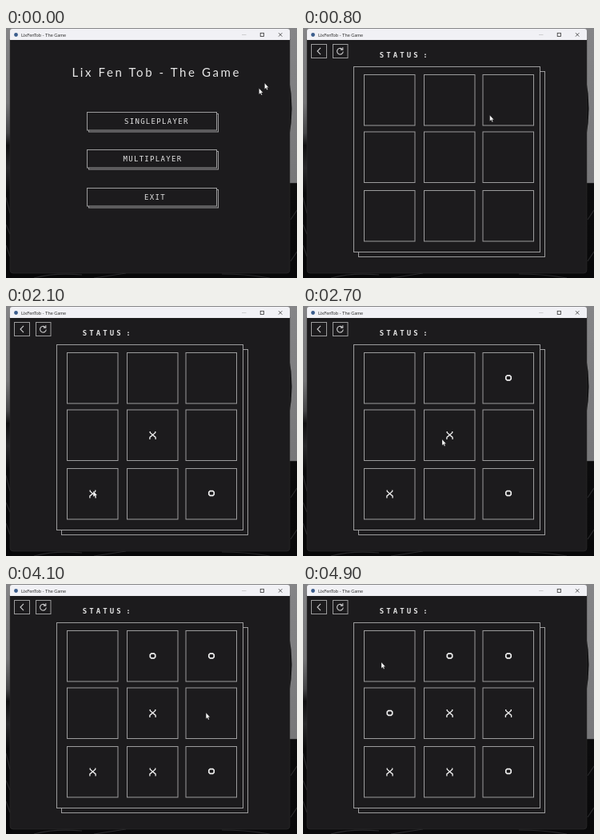
These frames come from a looping animation (364 px wide and 313 px high, 5000 ms). An HTML page:

```html
<!DOCTYPE html>
<html lang="en">
<head>
<meta charset="utf-8">
<title>LixFenTob - The Game</title>
<style>
  html, body { margin: 0; width: 100%; height: 100%; overflow: hidden; background: #080808; }
  svg { display: block; width: 364px; height: 313px; }
  .line, .box { fill: none; stroke: #9c9c9d; stroke-width: 1; }
  .box { fill: #1c1b1d; }
  .icon { fill: none; stroke: #d0d0d1; stroke-width: 1.1; }
  .caption { font: 5.8px Lato, "Open Sans", sans-serif; fill: #333; }
  .heading { font: 15px Lato, "Open Sans", sans-serif; letter-spacing: 2.6px; fill: #e8e8e8; }
  .pixel { font: 9px "DejaVu Sans Mono", "Noto Sans Mono", monospace; fill: #e4e4e4; }
  .label { letter-spacing: 1.3px; }
  .status { letter-spacing: 3.1px; font-weight: bold; }
  .mark { fill: none; stroke: #eee; stroke-width: 1.3; }
  .ring { stroke-width: 1.7; }
  .streak { fill: none; stroke: #29292b; stroke-width: 1.2; }
</style>
</head>
<body>
<svg viewBox="0 0 364 313" xmlns="http://www.w3.org/2000/svg">
  <defs>
    <linearGradient id="leftWall" x1="0" y1="0" x2="0" y2="1">
      <stop offset="0" stop-color="#858587"/>
      <stop offset=".3" stop-color="#747476"/>
      <stop offset=".42" stop-color="#454547"/>
      <stop offset=".47" stop-color="#101011"/>
      <stop offset=".56" stop-color="#29292b"/>
      <stop offset=".66" stop-color="#0b0b0c"/>
      <stop offset="1" stop-color="#070708"/>
    </linearGradient>
    <linearGradient id="rightWall" x1="0" y1="0" x2="0" y2="1">
      <stop offset="0" stop-color="#858587"/>
      <stop offset=".618" stop-color="#777779"/>
      <stop offset=".622" stop-color="#0c0c0d"/>
      <stop offset="1" stop-color="#080809"/>
    </linearGradient>
    <path id="arrow" d="M0 0V7.4L1.7 5.9L2.9 8.6L4 8.1L2.8 5.5H5Z" fill="#fff" stroke="#222" stroke-width=".3"/>
    <path id="X" class="mark" d="M-3.3-5V-3.6L0-.6L3.3-3.6V-5M-3.6 5V2.4L0-.6L3.6 2.4V5"/>
    <path id="O" class="mark ring" d="M-1.7-2.9H1.7L3.2-1.5V1.5L1.7 2.9H-1.7L-3.2 1.5V-1.5Z"/>
  </defs>

  <rect width="364" height="313" fill="#080809"/>
  <rect width="364" height="4" fill="#858587"/>
  <rect width="8" height="313" fill="url(#leftWall)"/>
  <rect x="352" width="12" height="313" fill="url(#rightWall)"/>
  <path d="M354 64Q361 100 354 138Z" fill="#111112"/>
  <path class="streak" d="M0 212L5 232M0 246L5 258M0 272L5 286M35 313Q60 306 95 309M110 313L150 307M270 308Q300 308 330 313M356 240L364 228M356 292L364 280"/>

  <path d="M5 14H355V303Q355 307 351 307H9Q5 307 5 303Z" fill="#1c1b1d" stroke="#323233" stroke-width=".5"/>
  <path d="M5 15V4Q5 1 8 1H352Q355 1 355 4V15Z" fill="#f1f1f5"/>
  <circle cx="12.5" cy="8.5" r="2.4" fill="#3b5d8c"/>
  <text class="caption" x="19" y="10.5">LixFenTob - The Game</text>
  <path d="M295 8.5H300.5" stroke="#c4c4c6" stroke-width=".8"/>
  <rect x="318.2" y="6.3" width="4.2" height="4.2" fill="none" stroke="#333" stroke-width=".8"/>
  <path d="M341 6.2L345.4 10.6M345.4 6.2L341 10.6" stroke="#333" stroke-width=".8"/>

  <g id="menu">
    <text class="heading" x="82.5" y="60.7">Lix Fen Tob - The Game</text>
  </g>
  <g id="game">
    <rect class="line" x="10.5" y="20.5" width="19" height="17"/>
    <rect class="line" x="37.5" y="20.5" width="18.5" height="17"/>
    <path class="icon" d="M22 24.8L18 29L22 33.2"/>
    <path class="icon" d="M48.7 26.2A3.8 3.8 0 1 0 50.2 29.4M49.8 24.2V27.1H46.9"/>
    <text class="pixel status" x="95.7" y="37.2">STATUS<tspan x="150.3">:</tspan></text>
    <rect class="box" x="69.5" y="54.5" width="233" height="232"/>
    <rect class="box" x="63.5" y="48.5" width="233" height="232"/>
  </g>
  <use id="ghost" href="#arrow" x="316.5" y="75.5"/>
  <use id="pointer" href="#arrow"/>
</svg>
<script>
const LOOP = 5000, STEP = 100, GAME_START = 700;
const $ = id => document.getElementById(id);
const menu = $("menu"), game = $("game"), pointer = $("pointer"), ghost = $("ghost");

function add(parent, tag, attrs, text = "") {
  const el = document.createElementNS("http://www.w3.org/2000/svg", tag);
  for (const key in attrs) el.setAttribute(key, attrs[key]);
  el.textContent = text;
  parent.append(el);
  return el;
}

[["SINGLEPLAYER", 148], ["MULTIPLAYER", 146.5], ["EXIT", 173]].forEach(([name, x], i) => {
  const y = 105.5 + Math.round(i * 47.3);
  add(menu, "rect", { class: "box", x: 103.5, y: y + 2, width: 162, height: 22.5 });
  add(menu, "rect", { class: "box", x: 101.5, y, width: 162, height: 22.5 });
  add(menu, "text", { class: "pixel label", x, y: y + 14.7 }, name);
});

for (const y of [58.5, 130, 203.5])
  for (const x of [76.5, 151.5, 225])
    add(game, "rect", { class: "line", x, y, width: 63.5, height: 63.5 });

// kind, centre, time of appearance
const marks = [
  ["X", 183.5, 162, 1300], ["O", 257, 234.5, 1400],
  ["X", 108.5, 235.5, 2100], ["O", 257, 90, 2200],
  ["X", 183.5, 235.5, 3300], ["O", 183.5, 90, 3400],
  ["X", 257, 162, 4300], ["O", 108.5, 161.5, 4400]
].map(([kind, x, y, at]) => ({ at, el: add(game, "use", { href: "#" + kind, x, y }) }));

// time, x, y of the pointer tip
const path = [
  [0, 323.5, 69], [100, 322, 63.5], [300, 292, 78], [600, 248, 103],
  [800, 233.7, 109.2], [1150, 184, 170], [1300, 182, 180], [1500, 181.5, 183.3],
  [1700, 170, 193], [2050, 109, 231.5], [2400, 109.5, 232],
  [2700, 174, 167], [3000, 174, 166], [3300, 175.5, 237.5],
  [3400, 175.5, 237.5], [3600, 178, 242], [3700, 180, 238],
  [4000, 250, 161.5], [4300, 250.5, 161], [4400, 244, 157],
  [4700, 110, 107], [4800, 100.5, 101.5], [4900, 98, 98]
];

function pointAt(t) {
  const i = path.findIndex(p => p[0] >= t);
  if (i < 1) return path[i ? path.length - 1 : 0].slice(1);
  const [t0, x0, y0] = path[i - 1], [t1, x1, y1] = path[i];
  const u = (t - t0) / (t1 - t0);
  return [x0 + (x1 - x0) * u, y0 + (y1 - y0) * u];
}

const show = (el, on) => el.setAttribute("visibility", on ? "visible" : "hidden");

function draw(now) {
  const t = Math.floor(now % LOOP / STEP) * STEP;
  const playing = t >= GAME_START;
  show(menu, !playing);
  show(game, playing);
  show(ghost, t === 0);
  for (const m of marks) show(m.el, t >= m.at);
  const [x, y] = pointAt(t);
  pointer.setAttribute("x", x);
  pointer.setAttribute("y", y);
}

const start = performance.now();
function tick() {
  draw(performance.now() - start);
  requestAnimationFrame(tick);
}
tick();
</script>
</body>
</html>
```
